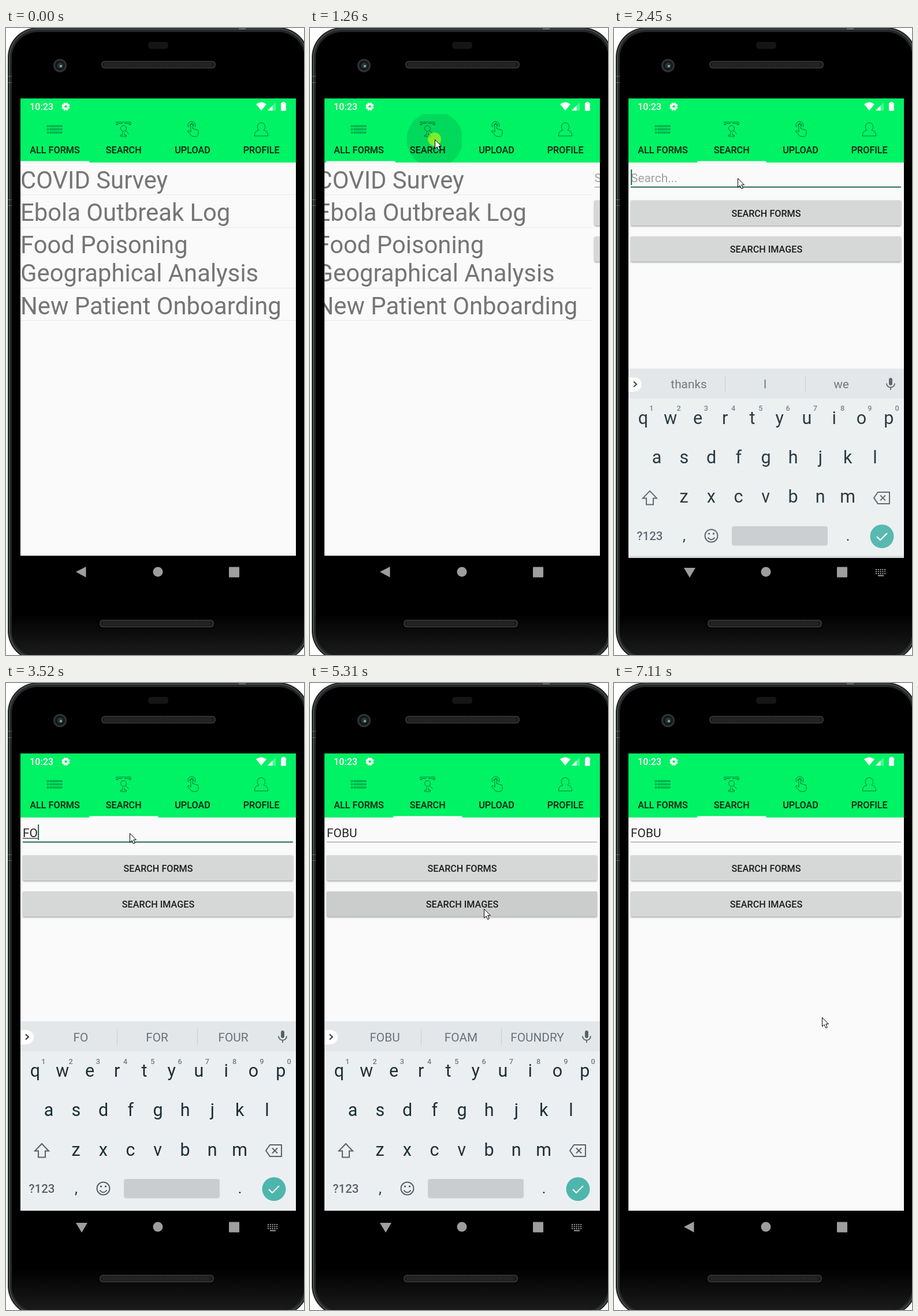
Animation of 516x1086 px, one loop 8000 ms. Source, as an HTML page with a canvas:

```html
<!DOCTYPE html>
<html lang="en">
<head>
<meta charset="utf-8">
<title>Phone form search</title>
<style>
html, body { margin: 0; width: 100%; height: 100%; overflow: hidden; background: #fff; }
canvas { display: block; }
</style>
</head>
<body>
<canvas id="stage" width="516" height="1086"></canvas>
<script>
const ctx = document.getElementById('stage').getContext('2d');
const LOOP = 8000;
const GREEN = '#00f265', PAPER = '#fafafa', ACCENT = '#1c6b54', GREY = '#9e9e9e';
const SCREEN = { x: 25, y: 122, w: 477, h: 792 };
const WORD = 'FOBU';
const KEY_TIMES = [3290, 3520, 3690, 3840];
const HINTS = [
  ['thanks', 'I', 'we'], ['F', 'For', 'From'], ['FO', 'FOR', 'FOUR'],
  ['FOB', 'FOG', 'FOBS'], [WORD, 'FOAM', 'FOUNDRY']
];
// start, end, number of screen updates
const BURSTS = [
  [70, 860, 12], [940, 1650, 10], [1880, 2520, 9],
  [4470, 4850, 6], [5160, 5650, 7], [7040, 7110, 2]
];
// time, x, y of the pointer tip
const PATH = [
  [70, 487, 957], [360, 300, 640], [575, 126, 400], [720, 165, 290], [860, 212, 196],
  [940, 216, 193], [1400, 216, 193], [1650, 216, 250], [1960, 216, 250], [2360, 214, 260],
  [4400, 214, 260], [4850, 301, 391], [5250, 301, 391], [5568, 503, 412],
  [7040, 396, 579], [7110, 360, 579]
];

const clamp = v => Math.max(0, Math.min(1, v));
const within = (t, a, b) => t >= a && t < b;
const easeOut = p => 1 - (1 - p) ** 2;

function snap(t) {
  for (const [a, b, n] of BURSTS) {
    if (within(t, a, b)) {
      const step = (b - a) / (n - 1);
      return a + Math.floor((t - a) / step + 0.001) * step;
    }
  }
  return t;
}

function rect(x, y, w, h, color) {
  ctx.fillStyle = color;
  ctx.fillRect(x, y, w, h);
}

function round(x, y, w, h, r, color) {
  ctx.beginPath();
  ctx.roundRect(x, y, w, h, r);
  ctx.fillStyle = color;
  ctx.fill();
}

function disc(x, y, r, color) {
  ctx.beginPath();
  ctx.arc(x, y, r, 0, Math.PI * 2);
  ctx.fillStyle = color;
  ctx.fill();
}

function poly(points, color) {
  ctx.beginPath();
  points.forEach(([x, y]) => ctx.lineTo(x, y));
  ctx.closePath();
  ctx.fillStyle = color;
  ctx.fill();
}

function line(d, color, width = 1, x = 0, y = 0) {
  ctx.save();
  ctx.translate(x, y);
  ctx.strokeStyle = color;
  ctx.lineWidth = width;
  ctx.stroke(new Path2D(d));
  ctx.restore();
}

function text(str, x, y, size, color, align = 'left', weight = 400) {
  ctx.font = `${weight} ${size}px Roboto, sans-serif`;
  ctx.textAlign = align;
  ctx.fillStyle = color;
  ctx.fillText(str, x, y);
}

function speaker(x, y) {
  round(x, y, 198, 13, 6, '#3b3b3b');
  round(x + 1.5, y + 1.5, 195, 10, 5, '#1c1c1c');
  for (let i = 6; i < 192; i += 3) rect(x + i, y + 3, 1, 7, '#303030');
}

function phone() {
  rect(0, 0, 516, 1086, '#fff');
  round(3, -1, 521, 1097, 52, '#1d2021');
  round(5, 1, 517, 1093, 50, '#43484a');
  round(7, 3, 513, 1089, 48, '#242728');
  round(10, 7, 507, 1081, 45, '#000');
  for (const y of [83, 94, 297, 307]) rect(3, y, 7, 1, '#606566');
  rect(403, 0, 12, 3, '#5d6263');
  const shade = ctx.createLinearGradient(0, 1015, 0, 1086);
  shade.addColorStop(0, '#000');
  shade.addColorStop(1, '#1b1b1b');
  round(11, 1010, 505, 77, [0, 0, 42, 42], shade);
  round(246, 24, 35, 12, 5, '#151515');
  disc(93.5, 65, 11.5, '#303233');
  disc(93.5, 65, 8.5, '#121718');
  disc(94, 65, 5, '#29383d');
  disc(95, 66, 2, '#8fa5aa');
  speaker(165, 57);
  speaker(162, 1025);
}

function statusBar() {
  text('10:23', 41, 142, 16.2, '#fff', 'left', 500);
  for (let i = 0; i < 4; i++) {
    ctx.save();
    ctx.translate(103.5, 136);
    ctx.rotate(i * Math.PI / 4 + Math.PI / 8);
    rect(-1.7, -7, 3.4, 14, '#fff');
    ctx.restore();
  }
  disc(103.5, 136, 5.4, '#fff');
  disc(103.5, 136, 2.3, GREEN);
  ctx.fillStyle = '#fff';
  ctx.fill(new Path2D('M433 132Q442 125 451 132L442 143Z'));
  poly([[467, 129], [467, 143], [453, 143]], 'rgba(255,255,255,.3)');
  poly([[461.5, 134.5], [461.5, 143], [453, 143]], '#fff');
  round(476, 129.5, 9, 14, 1, '#fff');
  rect(478.5, 128, 4, 2, '#fff');
}

function tabIcons() {
  const ink = 'rgba(0,50,22,.72)';
  for (let i = 0; i < 3; i++) {
    line('M1.5 0A1.5 1.5 0 1 0 1.5 3A1.5 1.5 0 1 0 1.5 0M5 .5H26V2.5H5Z', ink, 0.8, 71, 168.5 + i * 5.5);
  }
  line('M.5 5V.5H25.5V5H23V3H14.5M11 3H3V5H.5M11 18V23H8V25.5H18V23H14.5V19', ink, 0.9, 190.5, 162.5);
  line('M18 11.5A5 5 0 1 0 8 11.5A5 5 0 1 0 18 11.5M16.5 15L22 21', ink, 0.9, 190.5, 162.5);
  line('M7 17V5Q7 3 8.7 3Q10.5 3 10.5 5V12Q13 10 14 13Q16 11 17 14Q20 12 20 16V20Q20 25 15 25H11Q8 25 6 21L2 17Q1 14 4 15L7 17', ink, 0.9, 313, 163);
  line('M3 9A6.5 6.5 0 1 1 14 9M5.5 7A3.5 3.5 0 1 1 12 7', ink, 0.9, 313, 163);
  line('M7.5 14C3 11 4 1 11.5 1S20 11 15.5 14C21 15 23 18 23 24H0C0 18 2 15 7.5 14Z', ink, 0.9, 430.5, 163);
}

function tabBar(t, slide) {
  rect(SCREEN.x, SCREEN.y, SCREEN.w, 111, GREEN);
  if (within(t, 1170, 1640)) {
    ctx.save();
    ctx.beginPath();
    ctx.rect(144, 149, 119, 84);
    ctx.clip();
    disc(216, 193, 15 + 90 * clamp((t - 1170) / 230), `rgba(0,0,0,${0.1 * clamp((1640 - t) / 240)})`);
    ctx.restore();
  }
  statusBar();
  tabIcons();
  ['ALL FORMS', 'SEARCH', 'UPLOAD', 'PROFILE'].forEach((name, i) =>
    text(name, 84.5 + i * 119.25, 216.5, 16.2, 'rgba(0,0,0,.87)', 'center', 500));
  rect(25 + 119.25 * slide, 230.5, 119.25, 2.5, '#fff');
}

function formList() {
  const rows = [['COVID Survey', 278], ['Ebola Outbreak Log', 334], ['Food Poisoning', 390],
    ['Geographical Analysis', 439], ['New Patient Onboarding', 495.5]];
  for (const [name, y] of rows) text(name, 25, y, 41.8, '#757575');
  for (const y of [288, 345, 450, 506]) rect(25, y, 477, 1, '#e8e8e8');
}

function button(label, y, color) {
  ctx.save();
  ctx.shadowColor = 'rgba(0,0,0,.35)';
  ctx.shadowBlur = 3;
  ctx.shadowOffsetY = 1.5;
  round(29, y, 468, 43.5, 2, color);
  ctx.restore();
  text(label, 263.5, y + 28, 16.2, 'rgba(0,0,0,.87)', 'center', 500);
}

function searchPage(t, typed) {
  const focused = within(t, 1955, 5240);
  const caretOn = within(t, 2030, 2515) || within(t, 3060, 4300) || within(t, 4770, 5240);
  text(typed || 'Search...', 29, 267, 20.9, typed ? '#212121' : '#a0a0a0');
  const w = typed ? ctx.measureText(typed).width : 0;
  if (focused) {
    if (typed) rect(29, 268.5, w, 1.2, '#212121');
    if (caretOn) rect(29.2 + w, 245, 2, 27, ACCENT);
    rect(29, 274.5, 468, 2, ACCENT);
  } else {
    rect(29, 275, 468, 1, '#8c8c8c');
  }
  button('SEARCH FORMS', 298.5, '#d6d7d7');
  button('SEARCH IMAGES', 361, within(t, 5240, 7040) ? '#cbcccc' : '#d6d7d7');
}

function keyboard(t, count) {
  const inP = t >= 2515 ? 1 : clamp((t - 2230) / 320);
  const outP = clamp((t - 5240) / 245);
  const alpha = Math.min(1, inP * 1.42) * (1 - outP);
  if (alpha <= 0) return;
  const ink = '#1b2e38', soft = '#566168';

  ctx.save();
  ctx.globalAlpha = alpha;
  ctx.translate(0, 33 * (1 - easeOut(inP)) + 33 * outP * outP);
  rect(25, 586, 477, 328, '#eceff1');
  rect(25, 586, 477, 52, '#e3e7ea');

  round(25, 601, 23, 25, [0, 12.5, 12.5, 0], '#fff');
  line('M34 608.5L39 613L34 617.5', '#333', 2);
  HINTS[t < 3365 ? 0 : count].forEach((word, i) =>
    text(word, 129.5 + i * 132, 620.5, 20.8, '#667279', 'center'));
  rect(192, 599, 1, 28, '#c5cbcf');
  rect(331, 599, 1, 28, '#c5cbcf');
  round(476, 602, 6, 13, 3, soft);
  line('M472 611.5C472 621 486 621 486 611.5M479 618V623', soft, 1.8);

  [['qwertyuiop', 50.5, 682], ['asdfghjkl', 74, 750], ['zxcvbnm', 121, 818.5]].forEach(([keys, x, y]) =>
    [...keys].forEach((key, i) => text(key, x + i * 47.25, y, 30.5, ink, 'center')));
  for (let i = 0; i < 10; i++) {
    text((i + 1) % 10, 65 + i * 47.25, 659.5, 12.8, '#737c81', 'center', 500);
  }

  line('M62 798L74 810.5H68V821.5H56V810.5H50Z', soft, 2);
  line('M457 800H477V820H457L450 810ZM461 805.5L470 814.5M470 805.5L461 814.5', soft, 2);
  text('?123', 62, 883, 20.5, soft, 'center', 500);
  text(',', 121.5, 884, 25, ink, 'center');
  text('.', 405, 884, 25, ink, 'center');
  line('M179.5 875.5A11 11 0 1 0 157.5 875.5A11 11 0 1 0 179.5 875.5M162.5 878.5Q168.5 886 174.5 878.5', soft, 2);
  disc(164.5, 872, 1.7, soft);
  disc(172.5, 872, 1.7, soft);
  round(204, 859, 166, 33.5, 4, '#c9cdd0');
  disc(464, 876.5, 20.5, '#4db6ac');
  line('M455 877L461 883L473 871', '#fff', 2.2);
  ctx.restore();
}

function navBar(open) {
  if (open) {
    poly([[121, 935], [141, 935], [131, 952]], GREY);
    for (let i = 0; i < 15; i++) {
      rect(453 + (i % 5) * 3.8, 937 + Math.floor(i / 5) * 3.5, 2, 2, GREY);
    }
    rect(457, 947.5, 10, 2, GREY);
  } else {
    poly([[121, 942], [138.5, 933], [138.5, 951.5]], GREY);
  }
  disc(263, 942, 8.5, GREY);
  round(386, 933.5, 18, 18, 1, GREY);
}

function pointer(t) {
  if (t < 70 || within(t, 5640, 7040)) return;
  let i = 0;
  while (i < PATH.length - 2 && t >= PATH[i + 1][0]) i++;
  const [t0, x0, y0] = PATH[i], [t1, x1, y1] = PATH[i + 1];
  const p = clamp((t - t0) / (t1 - t0));
  const x = Math.round(x0 + (x1 - x0) * p), y = Math.round(y0 + (y1 - y0) * p);
  if (within(t, 1170, 1330) || within(t, 1880, 1955) || within(t, 5160, 5240)) {
    disc(x - 0.5, y - 0.5, 11.5, 'rgba(255,255,0,.5)');
  }
  ctx.save();
  ctx.translate(x + 0.5, y + 0.5);
  const arrow = new Path2D('M0 0V15.5L3.6 12.2L6.2 18L8.8 16.9L6.3 11.2H11Z');
  ctx.fillStyle = '#fff';
  ctx.fill(arrow);
  ctx.strokeStyle = '#000';
  ctx.lineWidth = 1;
  ctx.stroke(arrow);
  ctx.restore();
}

function draw(now) {
  const t = snap(now % LOOP);
  const slide = easeOut(clamp((t - 1250) / 390));
  const count = KEY_TIMES.filter(k => t >= k).length;

  phone();
  rect(SCREEN.x, SCREEN.y, SCREEN.w, SCREEN.h, PAPER);
  ctx.save();
  ctx.beginPath();
  ctx.rect(SCREEN.x, SCREEN.y, SCREEN.w, SCREEN.h);
  ctx.clip();
  ctx.translate(-SCREEN.w * slide, 0);
  if (slide < 1) formList();
  ctx.translate(SCREEN.w, 0);
  if (slide > 0) searchPage(t, WORD.slice(0, count));
  ctx.restore();
  tabBar(t, slide);
  keyboard(t, count);
  navBar(within(t, 2230, 5400));
  pointer(t);
}

const start = performance.now();
function tick() {
  draw(performance.now() - start);
  requestAnimationFrame(tick);
}
tick();
</script>
</body>
</html>
```
